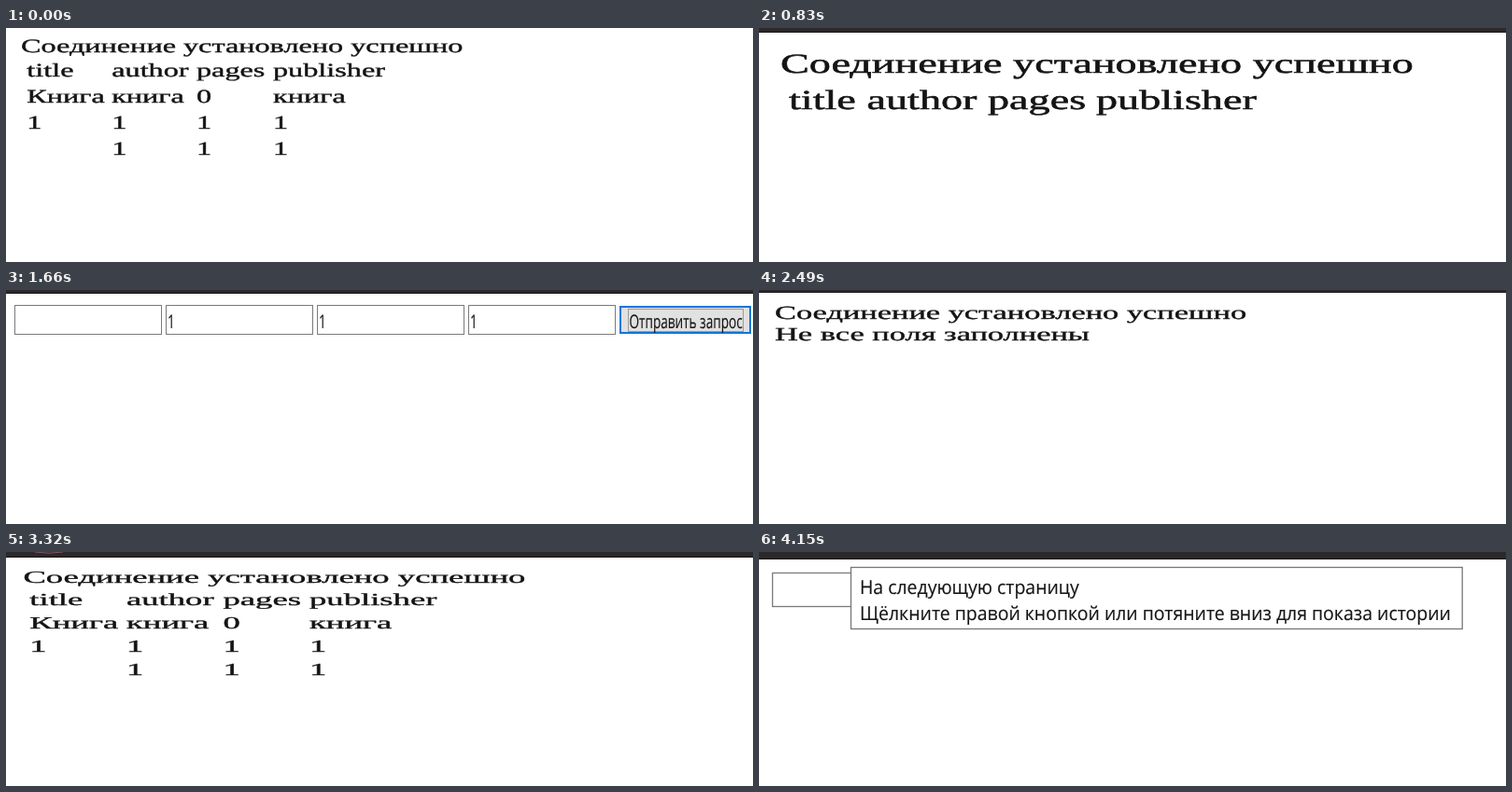
An HTML page for the animation above (4980 ms loop, 800 by 251 pixels).

```html
<!DOCTYPE html>
<html lang="ru">
<head>
<meta charset="utf-8">
<title>Форма и таблица</title>
<style>
html, body { margin: 0; width: 100%; height: 100%; overflow: hidden; background: #fff; }
svg { display: block; width: 800px; height: 251px; }
text { text-rendering: geometricPrecision; white-space: pre; }
.serif { font: 16px "Liberation Serif", "Times New Roman", serif; fill: #141414; stroke: #141414; stroke-width: 0.28px; }
.sans { font: 16px "Open Sans", "Noto Sans", sans-serif; fill: #151515; stroke: #151515; stroke-width: 0.12px; }
</style>
</head>
<body>
<svg id="stage" viewBox="0 0 800 251"></svg>
<script>
const NS = "http://www.w3.org/2000/svg";
const STEP = 830;
const stage = document.getElementById("stage");
const DONE = "Соединение установлено успешно";
const HEAD = ["title", "author", "pages", "publisher"];
const ROWS = [HEAD, ["Книга", "книга", "0", "книга"], ["1", "1", "1", "1"], ["", "1", "1", "1"]];

function add(parent, tag, attrs, content) {
  const el = document.createElementNS(NS, tag);
  for (const key in attrs) el.setAttribute(key, attrs[key]);
  if (content) el.textContent = content;
  parent.appendChild(el);
  return el;
}

function box(g, x, y, w, h, fill, stroke = "none", line = 1) {
  add(g, "rect", { x, y, width: w, height: h, fill, stroke, "stroke-width": line });
}

// Returns a writer for text on a page zoomed by sx and sy.
function writer(g, font, sx, sy) {
  return (x, y, str) => add(g, "text", {
    class: font, transform: `translate(${x} ${y}) scale(${sx} ${sy})`
  }, str);
}

function bar(g, h) {
  box(g, 0, 0, 800, h, "#2d292b");
  box(g, 0, h - 1, 800, 1, "#171516");
}

function input(g, x, y, w, h, line = 1) {
  box(g, x + 0.5, y + 0.5, w - 1, h - 1, "#fff", "#7a7a7a", line);
}

function table(write, cols, top, pitch) {
  ROWS.forEach((row, r) => row.forEach((str, c) => {
    if (str) write(cols[c], top + r * pitch, str);
  }));
}

const scenes = [
  g => {
    const write = writer(g, "serif", 2.015, 1.27);
    write(16, 26, DONE);
    table(write, [22.3, 113.2, 204, 286], 52, 28);
  },
  g => {
    bar(g, 5);
    const write = writer(g, "serif", 2.885, 1.84);
    write(23, 48, DONE);
    [32, 115.5, 245, 361].forEach((x, i) => write(x, 87, HEAD[i]));
  },
  g => {
    bar(g, 4);
    const write = writer(g, "sans", 0.85, 1.26);
    for (let i = 0; i < 4; i++) {
      const x = 9 + i * 162;
      input(g, x, 16, 158, 32);
      if (i) write(x + 2, 41, "1");
    }
    box(g, 658, 18, 139, 28, "#e1e1e1", "#0078d7", 2);
    add(g, "rect", {
      x: 666.5, y: 20.5, width: 123, height: 24, fill: "none",
      stroke: "#555", "stroke-dasharray": "1 1"
    });
    write(667.5, 41, "Отправить запрос");
  },
  g => {
    bar(g, 3);
    const write = writer(g, "serif", 2.15, 1.25);
    write(17, 31, DONE);
    write(17, 53.5, "Не все поля заполнены");
  },
  g => {
    bar(g, 6);
    add(g, "path", { d: "M31 0Q46 2.5 61 0", fill: "none", stroke: "#80585c" });
    const write = writer(g, "serif", 2.29, 1.14);
    write(18.4, 32.5, DONE);
    table(write, [25.3, 129, 232.5, 325], 56.5, 25);
  },
  g => {
    bar(g, 8);
    input(g, 14, 22, 100, 37, 1.3);
    box(g, 98.5, 16.5, 654.7, 66, "#fff", "#767676", 1.3);
    const write = writer(g, "sans", 1.216, 1.28);
    write(108, 45, "На следующую страницу");
    write(108, 73, "Щёлкните правой кнопкой или потяните вниз для показа истории");
  }
];

const layers = scenes.map(draw => {
  const g = add(stage, "g", { display: "none" });
  draw(g);
  return g;
});

function render(time) {
  const now = Math.floor(time / STEP) % layers.length;
  layers.forEach((g, i) => g.setAttribute("display", i === now ? "inline" : "none"));
}

const start = performance.now();
function tick() {
  render(performance.now() - start);
  requestAnimationFrame(tick);
}
tick();
</script>
</body>
</html>
```
